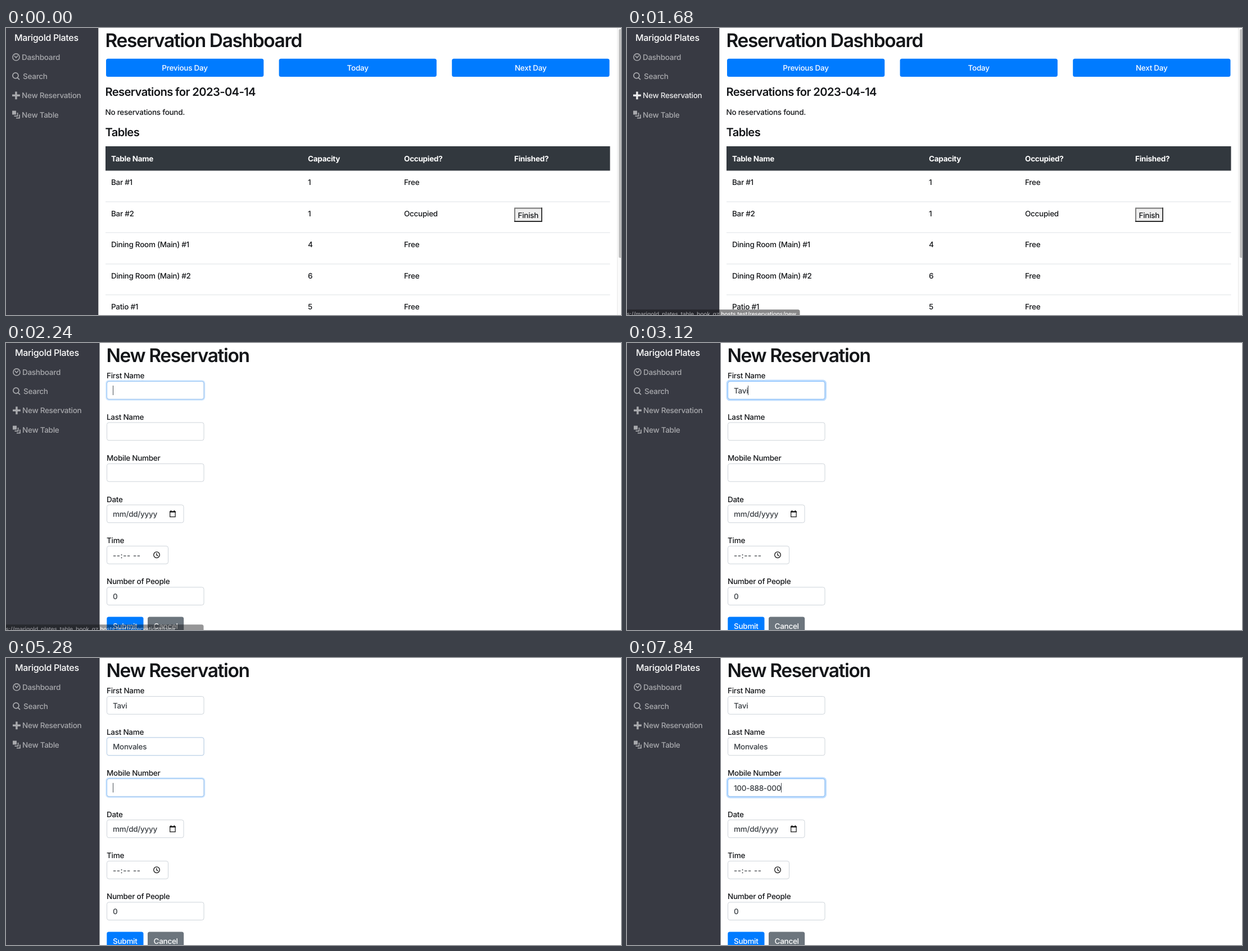
An HTML page that plays this animation: 1094 px wide and 512 px high, repeating every 8 s.

```html
<!DOCTYPE html>
<html lang="en">
<head>
<meta charset="utf-8">
<title>Reservations</title>
<style>
html, body { margin: 0; width: 100%; height: 100%; overflow: hidden; background: #fff; }
svg { display: block; width: 100%; height: 100%; }
text {
  font: 450 13.5px Inter, Roboto, "Liberation Sans", sans-serif;
  font-optical-sizing: none;
  letter-spacing: -.02em;
  text-rendering: geometricPrecision;
  white-space: pre;
  fill: #141619;
}
.h1 { font-size: 33.5px; font-weight: 600; letter-spacing: -.041em; }
.h4 { font-size: 20.2px; font-weight: 600; letter-spacing: -.031em; }
.brand { font-size: 16px; fill: #fff; }
.th { font-weight: 700; fill: #fff; }
.mid { text-anchor: middle; }
.light { fill: #fff; }
.value { fill: #383d42; }
.loose { letter-spacing: .04em; }
.url { font-size: 10.4px; text-anchor: end; fill: #fff; }
.nav text { fill: #fff; }
.nav path { fill: none; stroke: #fff; }
</style>
</head>
<body>
<svg id="stage" viewBox="0 0 1094 512"></svg>
<script>
const LOOP = 8000, FRAME = 40, PAGE_SWITCH = 1720, STEP = 73.44;
const stage = document.getElementById('stage');

function add(parent, tag, attrs = {}, content = '') {
  const el = document.createElementNS('http://www.w3.org/2000/svg', tag);
  for (const k in attrs) el.setAttribute(k, attrs[k]);
  el.textContent = content;
  parent.append(el);
  return el;
}
const text = (g, x, y, s, cls = '') => add(g, 'text', { x, y, class: cls }, s);
const rect = (g, x, y, width, height, fill, rx = 0, more = {}) =>
  add(g, 'rect', { x, y, width, height, fill, rx, ...more });
const show = (el, on) => el.setAttribute('visibility', on ? 'inherit' : 'hidden');
const clamp = v => Math.max(0, Math.min(1, v));
const ease = v => v * v * (3 - 2 * v);

// Icons on an 8-unit grid: path, stroke width
const NAV = [
  ['Dashboard', 28, 'M.5 4a3.5 3.5 0 1 0 7 0a3.5 3.5 0 1 0-7 0M5.8 2.4L4 4.8M2.2 2.6L4 4.8', .9],
  ['Search', 30, 'M.5 3.3a2.9 2.9 0 1 0 5.8 0a2.9 2.9 0 1 0-5.8 0M5.4 5.4L7.5 7.5', 1],
  ['New Reservation', 28, 'M4 0v8M0 4h8', 2],
  ['New Table', 28, 'M0 2h4M5.5 2v3.5H2M7.5 4v3.5H4', 1]
];

function sidebar(g, width, dx) {
  rect(g, 0, 0, width, 512, '#383a43');
  text(g, 15 + dx, 23, 'Marigold Plates', 'brand');
  return NAV.map(([label, x, d, w], i) => {
    const item = add(g, 'g', { class: 'nav' }), y = 52 + i * 34.2;
    const icon = add(item, 'g', { transform: `translate(${11 + dx} ${y - 7}) scale(1.73)` });
    add(icon, 'path', { d, 'stroke-width': w });
    if (i === 3) rect(icon, 0, 0, 4, 4, '#fff');
    text(item, x + dx, y + 5, label);
    return item;
  });
}

// Dashboard page
const dash = add(stage, 'g');
const dashNav = sidebar(dash, 164.3, 0);
text(dash, 176.5, 33.5, 'Reservation Dashboard', 'h1');
['Previous Day', 'Today', 'Next Day'].forEach((s, i) => {
  const x = 178 + i * 307.6;
  rect(dash, x, 54.7, 280.3, 32.3, '#007bff', 3.5);
  text(dash, x + 140, 76, s, 'mid light');
});
text(dash, 176.5, 120.5, 'Reservations for 2023-04-14', 'h4');
text(dash, 176.5, 154.5, 'No reservations found.');
text(dash, 176.5, 193, 'Tables', 'h4');
rect(dash, 177, 211, 897.5, 43.5, '#32383e');
const COLS = [187, 537, 708, 904];
['Table Name', 'Capacity', 'Occupied?', 'Finished?'].forEach((s, i) => text(dash, COLS[i], 238, s, 'th'));
[
  ['Bar #1', '1', 'Free'],
  ['Bar #2', '1', 'Occupied'],
  ['Dining Room (Main) #1', '4', 'Free'],
  ['Dining Room (Main) #2', '6', 'Free'],
  ['Patio #1', '5', 'Free']
].forEach((row, r) => {
  const y = 254 + r * 55.5;
  if (r) rect(dash, 177, Math.round(y) - .5, 897.5, 1, '#dee2e6');
  row.forEach((s, i) => text(dash, COLS[i], y + 26.3, s));
});
rect(dash, 904, 320.5, 50, 25.5, '#efefef');
add(dash, 'path', { d: 'M905 346V321.5H954', fill: 'none', stroke: '#767676', 'stroke-width': 1.8 });
add(dash, 'path', { d: 'M904 345H953V320.5', fill: 'none', stroke: '#2b2b2b', 'stroke-width': 1.8 });
text(dash, 910.5, 338.5, 'Finish');
rect(dash, 1087, 0, 7, 512, '#fafafa');
rect(dash, 1087, 0, 1, 512, '#e8e8e8');
rect(dash, 1090, 2, 5, 408, '#c1c1c1', 2);

// Form page
const form = add(stage, 'g');
const formNav = sidebar(form, 166.5, 1);
text(form, 178.5, 33.5, 'New Reservation', 'h1');

const ENTRIES = [
  { focus: 2140, value: 'Tavi', keys: [2880, 2960, 3040, 3120] },
  { focus: 3260, value: 'Monvales', keys: [3600, 3880, 4000, 4200, 4240, 4440, 4560, 4640] },
  { focus: 5180, value: '100-888-000', keys: [5720, 6080, 6280, 6600, 6760, 7040, 7200, 7360, 7560, 7720, 7840] }
];
[
  ['First Name', 173], ['Last Name', 173], ['Mobile Number', 173],
  ['Date', 137, 'mm/dd/yyyy'], ['Time', 109.5, '--:-- --', 'loose'], ['Number of People', 173, '0']
].forEach(([label, width, value = '', cls = ''], i) => {
  const y = 68.5 + i * STEP, entry = ENTRIES[i];
  const box = (fill, stroke) => rect(form, 179.5, y, width - .5, 31.8, fill, 3.5, { stroke });
  text(form, 179, y - 5.3, label);
  if (entry) entry.ring = box('none', '#007bff');
  box('#fff', '#ced4da');
  const shown = text(form, 190, y + 21.3, value, 'value ' + cls);
  if (entry) {
    entry.border = box('none', '#80bdff');
    entry.shown = shown;
    entry.caret = rect(form, 190, y + 7.5, 1, 17, '#495057');
  }
});
// Calendar and clock
add(form, 'path', { d: 'M291.7 300.5h9.4v9.6h-9.4z', fill: 'none', stroke: '#111', 'stroke-width': 1.2 });
add(form, 'path', { d: 'M291 301.3h10.8M293.5 298.5v3M299.3 298.5v3', fill: 'none', stroke: '#111', 'stroke-width': 1.7 });
add(form, 'path', { d: 'M262.7 378a5.3 5.3 0 1 0 10.6 0a5.3 5.3 0 1 0-10.6 0M268 374.7v3.6l2.6 1.7', fill: 'none', stroke: '#111', 'stroke-width': 1.3 });
rect(form, 179.3, 488.4, 65.2, 33, '#007bff', 3.5);
text(form, 190, 509.5, 'Submit', 'light');
rect(form, 252, 488.4, 64.2, 33, '#6c757d', 3.5);
text(form, 262.5, 509.5, 'Cancel', 'light');

// Link preview bar
const status = add(stage, 'g');
const bar = rect(status, -10, 502.3, 361, 20, '#141416', 3.5);
text(status, 301, 514.2, 'ps://marigold_plates_table_book_qz.hosts.test/reservations/new', 'url');

function drawEntry(entry, i, t) {
  const next = ENTRIES[i + 1], end = next ? next.focus : LOOP;
  const p = ease(clamp((t - entry.focus) / 150)) - ease(clamp((t - end) / 150));
  entry.ring.setAttribute('stroke-width', 1 + 5 * p);
  entry.ring.setAttribute('stroke-opacity', .25 * p);
  entry.border.setAttribute('stroke-opacity', p);

  const typed = entry.keys.filter(k => k <= t);
  entry.shown.textContent = entry.value.slice(0, typed.length);
  const last = typed.length ? typed[typed.length - 1] : entry.focus;
  const length = typed.length ? entry.shown.getComputedTextLength() : 0;
  entry.caret.setAttribute('x', Math.round(190 + length));
  show(entry.caret, t >= entry.focus && t < end && (t - last) % 1000 < 500);
}

function draw(now) {
  const t = Math.floor(now % LOOP / FRAME) * FRAME;
  const onForm = t >= PAGE_SWITCH;
  show(dash, !onForm);
  show(form, onForm);

  const hover = t < 1280 || t >= 2160 ? -1 : t < 1400 ? 0 : 2;
  (onForm ? formNav : dashNav).forEach((item, i) => item.setAttribute('opacity', i === hover ? .9 : .56));

  ENTRIES.forEach((entry, i) => drawEntry(entry, i, t));

  const alpha = t < 1680 ? 0 : onForm ? 1 - clamp((t - 2140) / 180) : .5;
  status.setAttribute('opacity', alpha);
  bar.setAttribute('width', onForm ? 361.5 : 317.5);
  requestAnimationFrame(draw);
}
requestAnimationFrame(draw);
</script>
</body>
</html>
```
